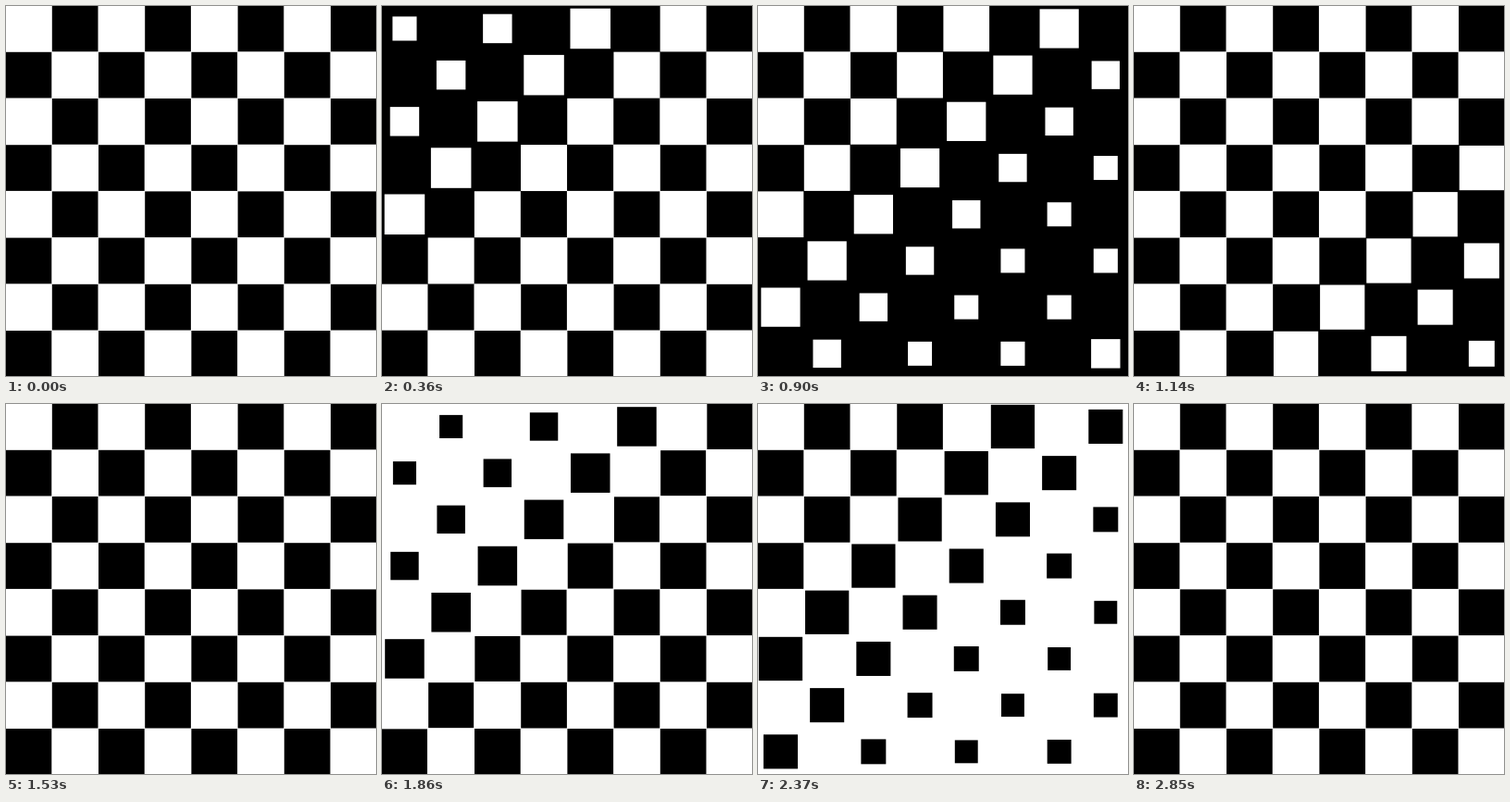
An HTML page with a canvas that plays this animation: 400 px wide and 400 px high, repeating every 2.88 s.

```html
<!DOCTYPE html>
<html lang="en">
<head>
<meta charset="utf-8">
<title>Checkerboard wave</title>
<style>
  html, body { margin: 0; width: 100%; height: 100%; overflow: hidden; background: #000; }
  canvas { display: block; width: 400px; height: 400px; }
</style>
</head>
<body>
<canvas id="board" width="400" height="400"></canvas>
<script>
const ctx = document.getElementById('board').getContext('2d');

const LOOP = 2880, HALF = LOOP / 2, STEP = 30;
const SIZE = 400, CELLS = 8, PITCH = 50.2, MID = 200.15;
const DIAGONAL_DELAY = 45, BLACK_LAG = 15;

// Each square dips to about half its side and grows back.
const DIP = 24.8, DIP_TIME = 410, DIP_WIDTH = 215, DIP_POWER = 3.2;

// White edges spread slightly over black ones.
const SPREAD = 0.5;

function sideAt(age) {
  const away = Math.abs(age - DIP_TIME) / DIP_WIDTH;
  return PITCH - DIP * Math.exp(-(away ** DIP_POWER));
}

const center = k => MID + (k - (CELLS - 1) / 2) * PITCH;

function draw(time) {
  const black = time >= HALF;
  const age = black ? time - HALF - BLACK_LAG : time;
  const spread = black ? -SPREAD : SPREAD;

  ctx.fillStyle = black ? '#fff' : '#000';
  ctx.fillRect(0, 0, SIZE, SIZE);
  ctx.fillStyle = black ? '#000' : '#fff';

  for (let row = 0; row < CELLS; row++) {
    // Squares of one colour sit on every second diagonal.
    for (let col = (row + black) % 2; col < CELLS; col += 2) {
      const side = sideAt(age - (row + col) * DIAGONAL_DELAY) + spread;
      ctx.fillRect(center(col) - side / 2, center(row) - side / 2, side, side);
    }
  }
}

const start = performance.now();
function tick() {
  const time = (performance.now() - start) % LOOP;
  draw(Math.floor(time / STEP) * STEP);
  requestAnimationFrame(tick);
}
tick();
</script>
</body>
</html>
```
